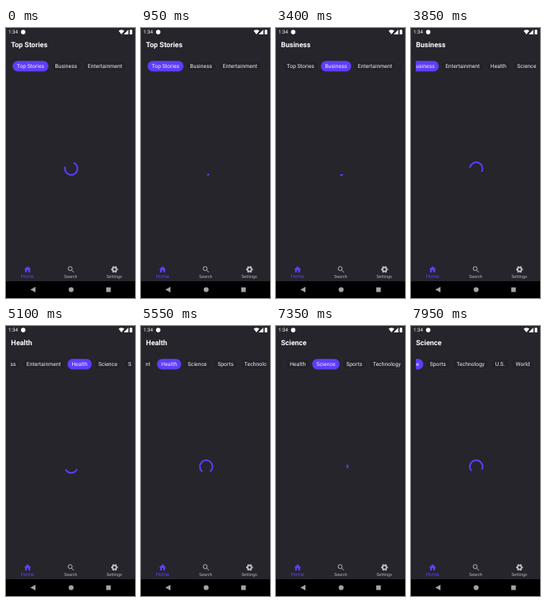
Animation of 162 by 338 pixels, one loop 8000 ms. Source, as an HTML page:

```html
<!DOCTYPE html>
<html lang="en">
<head>
<meta charset="utf-8">
<title>News loading</title>
<style>
  html, body { margin: 0; width: 100%; height: 100%; overflow: hidden; background: #26252c; }
  svg { display: block; width: 100%; height: 100%; }
  text { font-family: Roboto, sans-serif; fill: #fff; text-rendering: geometricPrecision; }
  .chip rect { fill: #232229; stroke: #34333b; stroke-width: .45; }
  .chip.on rect { fill: #5f3dfb; }
  .chip text { font-size: 6.75px; letter-spacing: .05px; fill: #f1f1f3; }
  .nav text { font-size: 5.4px; text-anchor: middle; fill: #b4b4b8; }
  .nav .active { font-size: 6.3px; fill: #5f3dfb; }
</style>
</head>
<body>
<svg viewBox="0 0 162 338">
  <defs><clipPath id="strip"><rect x="6" y="38" width="151.5" height="20"/></clipPath></defs>
  <rect width="162" height="338" fill="#26252c"/>

  <!-- status bar -->
  <text x="3" y="7.4" font-size="6.3">1:34</text>
  <g fill="#fff">
    <circle cx="21.6" cy="5.1" r="2.8"/>
    <path d="M141.4 3.6Q145 .9 148.6 3.6L145 8Z"/>
    <path d="M153.6 2V8H147.8Z"/>
    <path d="M155.4 2.6H156.3V2H157.6V2.6H158.5V8H155.4Z"/>
  </g>

  <text id="title" x="6.3" y="24" font-size="9" font-weight="700"></text>
  <g clip-path="url(#strip)"><g id="chips"></g></g>
  <path id="spinner" fill="none" stroke="#5f3dfb" stroke-width="2" stroke-linecap="square"/>

  <!-- bottom navigation -->
  <g class="nav">
    <path d="M10 20v-6h4v6h5v-8h3L12 3 2 12h3v8z" transform="translate(21.7 296.9) scale(.45)" fill="#5f3dfb"/>
    <g fill="none" stroke="#c4c4c8">
      <path d="M82.6 303.3L85.2 305.9" stroke-width="1"/>
      <circle cx="80.6" cy="301.2" r="2.5" stroke-width=".9"/>
      <circle cx="136.3" cy="302.2" r="2.5" stroke-width="1.7"/>
      <circle cx="136.3" cy="302.2" r="3.8" stroke-width="1.1" pathLength="12" stroke-dasharray="1" stroke-dashoffset=".5"/>
    </g>
    <text class="active" x="27" y="312.8">Home</text>
    <text x="81.3" y="312.8">Search</text>
    <text x="136" y="312.8">Settings</text>
  </g>

  <!-- system navigation -->
  <rect y="317" width="162" height="21" fill="#000"/>
  <g fill="#a3a3a3">
    <path d="M30.6 327.5L37 324V331Z"/>
    <circle cx="81.8" cy="327.5" r="3.1"/>
    <rect x="125.8" y="324.7" width="5.8" height="5.8"/>
  </g>
</svg>
<script>
const LOOP = 8000;
const topics = ["Top Stories", "Business", "Entertainment", "Health", "Science", "Sports", "Technology", "U.S.", "World"];
const selections = [[0, "Top Stories"], [2950, "Business"], [4750, "Health"], [6150, "Sports"], [7050, "Science"]];
const swipes = [
  { start: 3480, length: 950, distance: 77 },
  { start: 5200, length: 700, distance: 65.2 },
  { start: 7660, length: 310, distance: 64.5 }
];
const title = document.getElementById("title");
const strip = document.getElementById("chips");
const spinner = document.getElementById("spinner");

function add(parent, tag, attributes) {
  const node = document.createElementNS("http://www.w3.org/2000/svg", tag);
  for (const name in attributes) node.setAttribute(name, attributes[name]);
  return parent.appendChild(node);
}

let left = 8.1;
const chips = topics.map(topic => {
  const group = add(strip, "g", { class: "chip" });
  const box = add(group, "rect", { x: left, y: 41.1, height: 13.5, rx: 6.75 });
  const label = add(group, "text", { x: left + 5.4, y: 50.2 });
  label.textContent = topic;
  const width = label.getComputedTextLength() + 10.8;
  box.setAttribute("width", width);
  left += width + 2.7;
  return group;
});

const clamp = x => Math.min(1, Math.max(0, x));
const easeOut = x => 1 - (1 - clamp(x)) ** 3;

// cubic-bezier(.4, 0, .2, 1)
function fastOutSlowIn(x) {
  x = clamp(x);
  let low = 0, high = 1;
  for (let i = 0; i < 20; i++) {
    const m = (low + high) / 2;
    const at = 1.2 * m * (1 - m) ** 2 + 0.6 * m * m * (1 - m) + m ** 3;
    if (at < x) low = m; else high = m;
  }
  return 3 * low * low * (1 - low) + low ** 3;
}

function drawSpinner(time) {
  const phase = time % 1333 / 1333;
  const turn = time % 2222 / 2222;
  const head = fastOutSlowIn(phase * 2);
  const tail = fastOutSlowIn(phase * 2 - 1);
  const start = Math.PI * (-0.5 + 1.5 * tail + 2 * turn + 0.5 * phase);
  const sweep = Math.max(Math.PI * 1.5 * (head - tail), 0.01);
  const radius = 7.9;
  const point = a => `${81.9 + radius * Math.cos(a)} ${176 + radius * Math.sin(a)}`;
  spinner.setAttribute("d",
    `M${point(start)}A${radius} ${radius} 0 ${sweep > Math.PI ? 1 : 0} 1 ${point(start + sweep)}`);
}

function draw(t) {
  const current = selections.filter(([from]) => from <= t).pop()[1];
  title.textContent = current;
  chips.forEach((chip, i) => chip.classList.toggle("on", topics[i] === current));
  const scroll = swipes.reduce((sum, s) => sum + s.distance * easeOut((t - s.start) / s.length), 0);
  strip.setAttribute("transform", `translate(${-scroll} 0)`);
  drawSpinner(t + 4444);
}

function tick() {
  draw(performance.now() % LOOP);
  requestAnimationFrame(tick);
}
tick();
</script>
</body>
</html>
```
